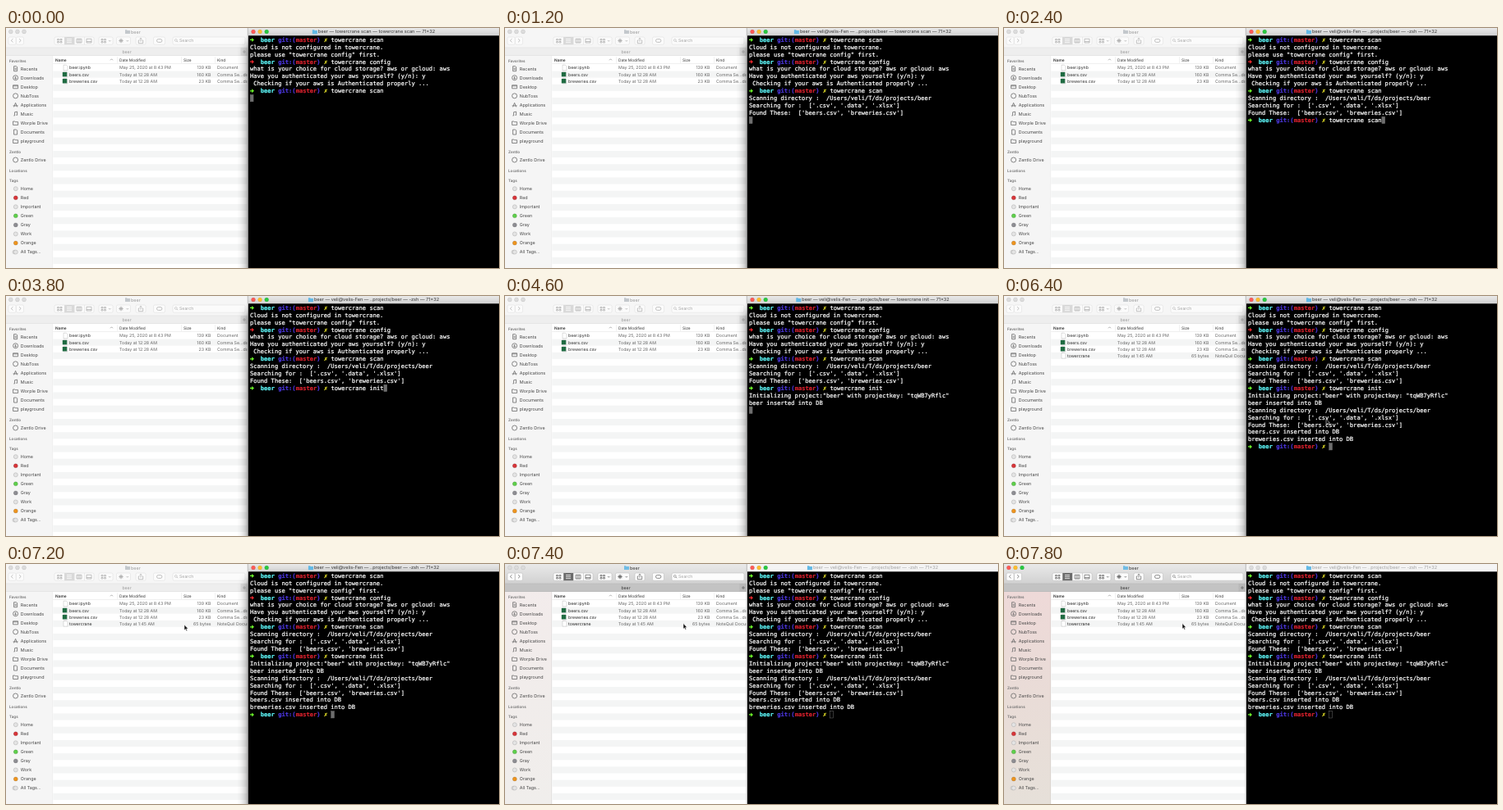
Write an HTML page that moves like this. It is 600 by 293 pixels and loops after 8 s.

```html
<!DOCTYPE html>
<html lang="en">
<head>
<meta charset="utf-8">
<title>Terminal and file window</title>
<style>
html, body { margin: 0; width: 100%; height: 100%; overflow: hidden; background: #fff; }
svg { display: block; width: 600px; height: 293px; }
text { white-space: pre; text-rendering: geometricPrecision; font-family: Inter, Roboto, sans-serif; }

#finder { --bar: #f6f6f6; --tab: #eeeeee; --plus: #dedede; --line: #dadada; --ink: #a9a9a9; --button: #fbfbfb;
  --picked: #d9d9d9; --label: #9a9a9a; --row: #2c2c2c; --folder: #c3c8cc; }
#finder.on { --bar: url(#chrome); --tab: #c3c3c3; --plus: #b8b8b8; --line: #b5b5b5; --ink: #5c5c5c; --button: #fcfcfc;
  --picked: #6b6b6b; --label: #333; --row: #222; --folder: #70bce4; }
.on .shade { display: none; }
.bar { fill: var(--bar); }
.tab { fill: var(--tab); }
.plus { fill: var(--plus); }
.rule { fill: var(--line); }
.button { fill: var(--button); stroke: var(--line); stroke-width: .5; }
.picked { fill: var(--picked); }
.icon { fill: none; stroke: var(--ink); stroke-width: .7; }
.label { font-size: 5.5px; fill: var(--label); }
.small { font-size: 5.2px; }
.head { font-size: 4.8px; fill: #333; }
.row { font-size: 5.2px; fill: var(--row); }
.info { font-size: 5.25px; fill: #666; }
.place { font-size: 5.4px; fill: #444; }
.group { font-size: 4.6px; font-weight: 600; fill: #707070; }
.glyph { fill: none; stroke: #6a6a6a; stroke-width: .8; stroke-linejoin: round; }

#term { --title: url(#chrome); --name: #333; }
#term.off { --title: #f4f4f4; --name: #a0a0a0; }
.title { fill: var(--title); }
#name { font-size: 5.6px; fill: var(--name); }
#shell { color: #fff; }
#shell text { font-family: "DejaVu Sans Mono", "Liberation Mono", monospace; font-size: 7.1px;
  fill: currentColor; stroke: currentColor; stroke-width: .22; }
#shell .b { font-weight: bold; }
#cursor { fill: #6e6e6e; stroke: #6e6e6e; stroke-width: .5; }
.off #cursor { fill: none; }
</style>
</head>
<body>
<svg viewBox="0 0 600 293">
  <defs>
    <linearGradient id="chrome" x2="0" y2="1">
      <stop stop-color="#e9e9e9"/><stop offset="1" stop-color="#d1d1d1"/>
    </linearGradient>
    <linearGradient id="tint" x2="0" y2="1">
      <stop stop-color="#eed9d8"/><stop offset=".5" stop-color="#e9dcd7"/><stop offset="1" stop-color="#e6e0d9"/>
    </linearGradient>
    <filter id="blur" x="-1" width="3"><feGaussianBlur stdDeviation="6"/></filter>
    <clipPath id="list"><path d="M57 34H293.5V293H57Z"/></clipPath>
    <clipPath id="window"><path d="M0 0H295V293H0Z"/></clipPath>
  </defs>
  <g id="finder"></g>
  <g id="term">
    <rect x="295" width="305" height="293"/>
    <rect class="title" x="295" width="305" height="9.3"/>
    <g id="termLights"></g>
    <path id="folder" d="M0 1H2.2L2.8 1.7H6V6H0Z" fill="#62b9e6"/>
    <text id="name" x="451" y="6.4" text-anchor="middle"></text>
    <g id="shell"></g>
    <rect id="cursor" width="3.8" height="8.3"/>
  </g>
  <path id="mouse" d="M0 0V6.6L1.5 5.3L2.5 7.6L3.6 7.1L2.6 4.9H4.6Z" fill="#111" stroke="#fff" stroke-width=".5"/>
</svg>
<script>
const LOOP = 8000, STEP = 200;
const COL = 4.28, ROW = 8.92, FILE_ROW = 8.12;
const $ = id => document.getElementById(id);
const esc = s => s.replace(/&/g, "&amp;").replace(/</g, "&lt;");
const text = (x, y, s, cls, more = "") => `<text x="${x}" y="${y}" class="${cls}" ${more}>${esc(s)}</text>`;
const rect = (x, y, w, h, cls, more = "") => `<rect x="${x}" y="${y}" width="${w}" height="${h}" class="${cls}" ${more}/>`;
const path = (d, cls, x = 0, y = 0, more = "") => `<path d="${d}" class="${cls}" transform="translate(${x} ${y})" ${more}/>`;
const dot = (x, y, r, fill, stroke) => `<circle cx="${x}" cy="${y}" r="${r}" fill="${fill}" stroke="${stroke}" stroke-width=".5"/>`;
const from = (t, body) => `<g data-from="${t}">${body}</g>`;

const LIGHTS = ["#fc5b57", "#fdbd2e", "#29c840"];
const GREYS = Array(3).fill("#dcdcdc");
const lights = (x, fills) => fills.map((c, i) => dot(x + i * 8.1, 4.4, 2.5, c, "#0002")).join("");

// File window
function toolbar() {
  const button = (x, w) => rect(x, 11, w, 9.2, "button", 'rx="1.5"');
  const segments = [59, 71, 83, 95];
  return rect(0, 0, 294, 24, "bar") + '<g id="finderLights"></g>' +
    path("M0 0H2L2.6 .7H6V4.6H0Z", "", 145, 2.3, 'fill="var(--folder)"') + text(152, 6.6, "beer", "label") +
    button(3, 9) + button(12.5, 9) +
    path("M8.5 13.2L6.3 15.3L8.5 17.4M16 13.2L18.2 15.3L16 17.4", "icon") +
    button(59, 48) + rect(71, 11, 12, 9.2, "picked") +
    segments.slice(1).map(x => rect(x, 11, .5, 9.2, "rule")).join("") +
    path("M62.5 13.5H64.5V15H62.5ZM66 13.5H68V15H66ZM62.5 16.5H64.5V18H62.5ZM66 16.5H68V18H66Z", "icon") +
    '<path d="M74 13.5H80M74 15.6H80M74 17.7H80" stroke="#fff" stroke-width=".8"/>' +
    path("M86 13.3H92V18H86ZM88 13.3V18M90 13.3V18", "icon") +
    path("M98 13.3H104V18H98ZM98 16.6H104", "icon") +
    button(113, 17) +
    path("M116 13.5H118V15H116ZM119.5 13.5H121.5V15H119.5ZM116 16.5H118V18H116ZM119.5 16.5H121.5V18H119.5ZM125 15L126.3 16.3L127.6 15", "icon") +
    button(134.5, 17) + dot(140, 15.5, 1.7, "none", "var(--ink)") +
    path("M140 12.7V18.3M137.2 15.5H142.8M138.1 13.6L141.9 17.4M138.1 17.4L141.9 13.6M146.5 15L147.8 16.3L149.1 15", "icon") +
    button(158, 12) + path("M162.5 15H161.3V18.7H166.7V15H165.5M164 16.7V12.3M162.8 13.5L164 12.3L165.2 13.5", "icon") +
    button(179.5, 14) + rect(183.5, 13.6, 6.4, 3.8, "icon", 'rx="1.9"') +
    button(203, 88) + dot(206.8, 14.9, 1.4, "none", "var(--ink)") + path("M207.9 16L209 17.2", "icon") +
    text(211, 17.2, "Search", "small", 'fill="#a5a5a5"') +
    rect(0, 24, 294, 10, "tab") + rect(285.5, 24, 8.5, 10, "plus") +
    rect(0, 23.7, 294, .5, "rule") + rect(0, 33.5, 294, .5, "rule") +
    text(147, 30.5, "beer", "label small", 'text-anchor="middle"') +
    path("M288 29H292M290 27V31", "icon");
}

function sidebar() {
  const folder = "M0 1H2.2L2.8 1.7H6V5.4H0Z", page = "M1 0H4L5 1V6H1Z";
  const ring = "M0 3A3 3 0 1 0 6 3A3 3 0 1 0 0 3";
  const places = [
    ["Recents", page + "M2 2.5H4M2 4H4"], ["Downloads", ring + "M3 1.3V4.5M1.7 3.3L3 4.5L4.3 3.3"],
    ["Desktop", "M0 1H6V5H0ZM0 2H6"], ["NubToss", ring],
    ["Applications", "M1 5.5L3 .5L5 5.5M0 4H6"], ["Music", "M2 5V.8L5 .2V4.4M.8 5H2M3.8 4.4H5"],
    ["Worple Drive", folder], ["Documents", page], ["playground", folder]
  ];
  const place = ([name, d], y) => path(d, "glyph", 8.6, y - 3) + text(17.8, y + 1.9, name, "place");
  const tags = [["Home"], ["Red", "#d8363a"], ["Important"], ["Green", "#5fd04c"], ["Gray", "#8e8e93"],
    ["Work"], ["Orange", "#ee951f"], ["All Tags..."]];
  const tag = ([name, fill], i) => {
    const y = 196.2 + i * 11.05, edge = fill ? "#0004" : "#aaa", hollow = "#e4e4e4";
    const twin = i === 7 ? dot(10.3, y, 2.3, hollow, edge) : "";
    return twin + dot(11.8, y, 2.5, fill || hollow, edge) + text(17.8, y + 1.9, name, "place");
  };
  return rect(0, 34, 57, 259, "", 'fill="#f5f5f5"') +
    rect(0, 34, 57, 259, "", 'id="glow" fill="url(#tint)"') + rect(56.8, 34, .5, 259, "rule") +
    [["Favorites", 41.8], ["Zentlo", 152.5], ["Locations", 176.3], ["Tags", 188.2]]
      .map(([s, y]) => text(4, y, s, "group")).join("") +
    places.map((p, i) => place(p, 49.7 + i * 11.05)).join("") + place(["Zentlo Drive", ring], 161) +
    tags.map(tag).join("");
}

function fileList() {
  const stripes = Array.from({ length: 16 }, (_, i) =>
    rect(57.3, 44.4 + FILE_ROW * (2 * i + 1), 237, FILE_ROW, "", 'fill="#f4f5f5"')).join("");
  const heads = [["Name", 60], ["Date Modified", 138], ["Size", 216], ["Kind", 257]];
  const file = (n, name, date, size, kind, sheet) => {
    const y = 50.4 + n * FILE_ROW;
    return path("M70 0H73.4L75 1.6V6.6H70Z", "", 0, y - 5.2, 'fill="#fff" stroke="#aaa" stroke-width=".4"') +
      (sheet ? rect(68.8, y - 4.6, 5.4, 5.4, "", 'fill="#1f6b42"') : "") +
      text(77, y, name, "row") + text(138, y, date, "info") +
      text(249.5, y, size, "info", 'text-anchor="end"') + text(257, y, kind, "info");
  };
  return '<g clip-path="url(#list)">' + rect(57.3, 34, 237, 259, "", 'fill="#fff"') + stripes +
    heads.map(([s, x], i) => text(x, 40.6, s, "head", i ? "" : 'font-weight="600"')).join("") +
    [135, 213, 254].map(x => rect(x, 35, .4, 8, "", 'fill="#ddd"')).join("") +
    rect(57.3, 43.6, 237, .4, "", 'fill="#d8d8d8"') +
    '<path d="M127 39.3L128.5 37.8L130 39.3" fill="none" stroke="#777" stroke-width=".6"/>' +
    file(0, "beer.ipynb", "May 25, 2020 at 8:43 PM", "139 KB", "Document") +
    file(1, "beers.csv", "Today at 12:28 AM", "160 KB", "Comma Se…dsheet", true) +
    file(2, "breweries.csv", "Today at 12:28 AM", "23 KB", "Comma Se…dsheet", true) +
    from(5200, file(3, "towercrane", "Today at 1:45 AM", "65 bytes", "")) +
    from(5600, text(257, 50.4 + 3 * FILE_ROW, "NoteQuil Document", "info")) + "</g>" +
    rect(293.7, 0, 1.3, 293, "", 'fill="#c4c4c4"');
}

// Shadow that the front terminal drops on the file window
const shade = '<g class="shade" clip-path="url(#window)">' +
  rect(293, 20, 40, 320, "", 'fill="#000" opacity=".45" filter="url(#blur)"') + "</g>";

// Terminal
const colX = c => 297 + c * COL;
const rowY = r => 16.8 + (r - 1) * ROW;
const out = (r, s) => text(297, rowY(r), s, "");
function prompt(r, cmd, arrow = "#6cf52a") {
  const part = (c, s, color) => text(colX(c), rowY(r), s, "b", `style="color:${color}"`);
  return path("M0 -.7H2.2V-2.5L5 0L2.2 2.5V.7H0Z", "", 297, rowY(r) - 2.4, `fill="${arrow}"`) +
    part(3, "beer", "#5cf4f6") + part(8, "git:(", "#4a35d8") +
    part(13, "master", "#d3202c") + part(19, ")", "#4a35d8") + part(21, "✗", "#f2ee2c") +
    text(colX(23), rowY(r), cmd, "");
}
const scanned = r => [
  "Scanning directory :  /Users/veli/T/ds/projects/beer",
  "Searching for :  ['.csv', '.data', '.xlsx']",
  "Found These:  ['beers.csv', 'breweries.csv']"
].map((s, i) => out(r + i, s)).join("");

$("finder").innerHTML = toolbar() + sidebar() + fileList() + shade;
$("shell").innerHTML =
  prompt(1, "towercrane scan") +
  out(2, "Cloud is not configured in towercrane.") +
  out(3, 'please use "towercrane config" first.') +
  prompt(4, "towercrane config", "#e8262c") +
  out(5, "what is your choice for cloud storage? aws or gcloud: aws") +
  out(6, "Have you authenticated your aws yourself? (y/n): y") +
  out(7, " Checking if your aws is Authenticated properly ...") +
  prompt(8, "towercrane scan") +
  from(1200, scanned(9)) +
  from(1400, prompt(12, "")) + text(colX(23), rowY(12), "", "", 'id="typed"') +
  from(4600, out(13, 'Initializing project:"beer" with projectkey: "tqWB7yRflc"') + out(14, "beer inserted into DB")) +
  from(4800, scanned(15) + out(18, "beers.csv inserted into DB") + out(19, "breweries.csv inserted into DB")) +
  from(5000, prompt(20, ""));

const HOME = "beer — veli@velis-Fen — ..projects/beer — ";
const titles = [
  [0, "beer — towercrane scan — towercrane scan"], [1200, HOME + "towercrane scan"], [1400, HOME + "-zsh"],
  [4000, "beer — towercrane init — towercrane init"], [4600, HOME + "towercrane init"], [5000, HOME + "-zsh"]
];
const typing = [
  [0, ""], [2400, "towercrane scan"], [2600, "towercrane sca"], [2800, "towercrane s"], [3000, "towercrane "],
  [3400, "towercrane i"], [3600, "towercrane ini"], [3800, "towercrane init"]
];
const cursorRows = [[0, 9], [1200, 12], [4000, 13], [4600, 15], [4800, 20]];
const at = (list, t) => list.filter(([start]) => start <= t).pop()[1];
const timed = [...document.querySelectorAll("[data-from]")];
const move = (el, x, y) => el.setAttribute("transform", `translate(${x} ${y})`);
const clamp = v => Math.max(0, Math.min(1, v));
let last = -1;

function render(t) {
  for (const el of timed) el.style.display = t >= +el.dataset.from ? "" : "none";

  const name = $("name"), typed = at(typing, t);
  name.textContent = at(titles, t) + " — 71×32";
  move($("folder"), 451 - name.getComputedTextLength() / 2 - 7, 1.2);
  $("typed").textContent = typed;
  const atPrompt = (t >= 1400 && t < 4000) || t >= 5000;
  const col = atPrompt ? 23 + (t < 4000 ? typed.length : 0) : 0;
  move($("cursor"), colX(col) + .25, rowY(at(cursorRows, t)) - 6.6);

  const swapped = t >= 7400, lit = t >= 7600;
  $("finder").classList.toggle("on", swapped);
  $("term").classList.toggle("off", swapped);
  $("finderLights").innerHTML = lights(5.8, lit ? LIGHTS : GREYS);
  $("termLights").innerHTML = lights(301, lit ? GREYS : LIGHTS);
  $("glow").style.opacity = clamp((t - 7200) / 600);

  const rest = (1 - clamp((t - 6400) / 600)) ** 2;
  $("mouse").style.display = t >= 6400 ? "" : "none";
  move($("mouse"), 217 + 175 * rest, (swapped ? 72.6 : 74.2) + 76 * rest);
}

function tick() {
  const t = Math.floor(performance.now() % LOOP / STEP) * STEP;
  if (t !== last) render(last = t);
  requestAnimationFrame(tick);
}
tick();
</script>
</body>
</html>
```
